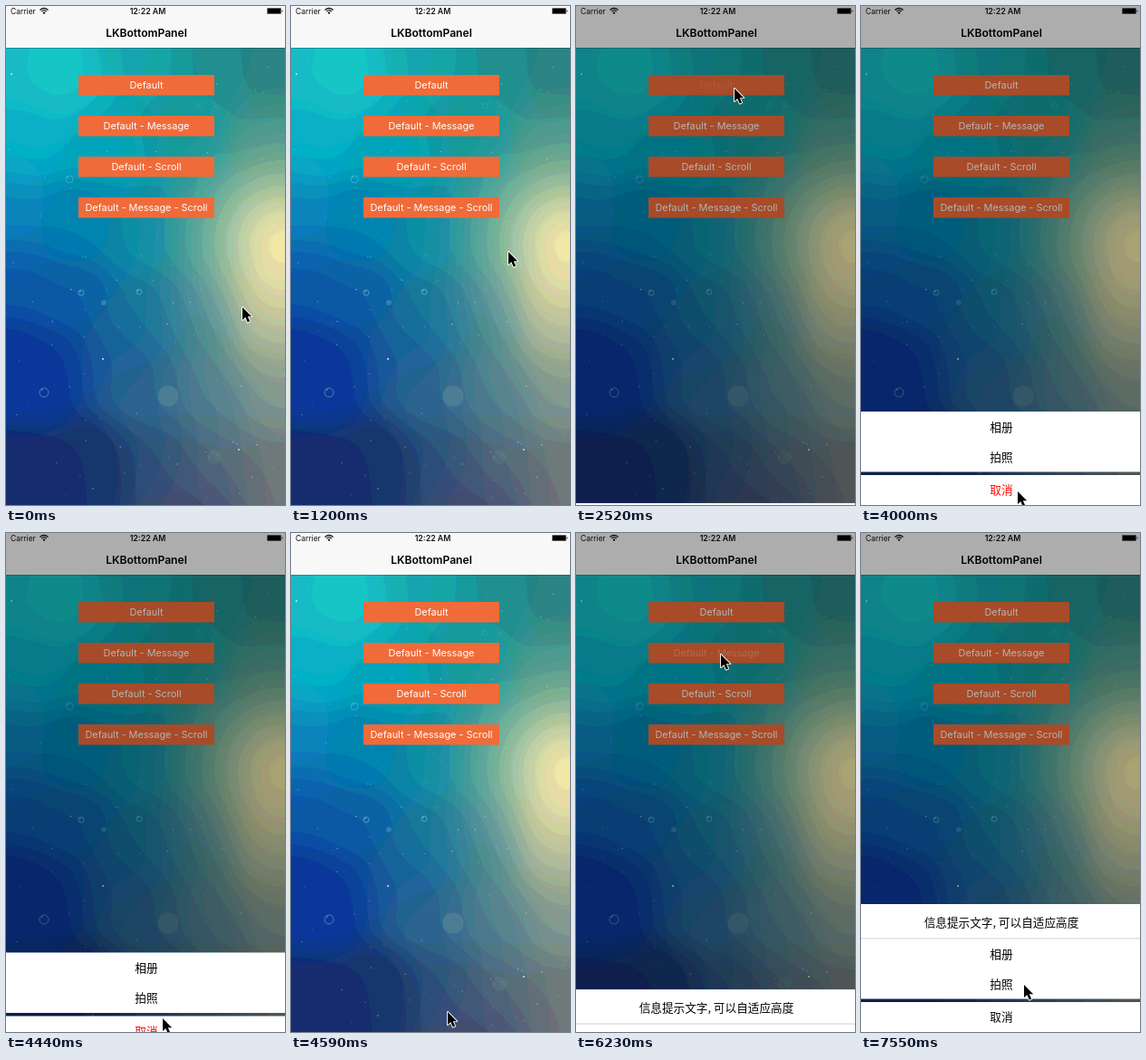
Animation, 308 px wide and 550 px high, one loop 8 s. Source, as an HTML page with a canvas:

```html
<!DOCTYPE html>
<html lang="zh-CN">
<head>
<meta charset="utf-8">
<title>Action sheet demo</title>
<style>
html, body { margin: 0; width: 100%; height: 100%; overflow: hidden; background: #fff; }
canvas { display: block; width: 308px; height: 550px; }
</style>
</head>
<body>
<canvas id="stage"></canvas>
<script>
const W = 308, H = 550, LOOP = 8000, NAV = 46;
const LATIN = 'Inter, Roboto, sans-serif';
const HAN = '"Noto Sans CJK SC", "Noto Sans CJK", sans-serif';

const canvas = document.getElementById('stage');
const dpr = window.devicePixelRatio || 1;
canvas.width = W * dpr;
canvas.height = H * dpr;
const ctx = canvas.getContext('2d');

// ---------- wallpaper ----------
const TINTS = [
  [0, 60, '14bfc8'], [60, 80, '1cc4cc'], [150, 60, '14a9ac'], [225, 60, '1d9090'], [300, 60, '2a8082'],
  [20, 150, '05aec8'], [110, 150, '00a5b8'], [190, 130, '12989c'], [300, 140, '3a9088'],
  [0, 230, '0a86bc'], [80, 240, '0080b0'], [150, 250, '0a8ca4'], [215, 250, '2f9498'],
  [0, 295, '0758aa'], [70, 320, '0a5ca4'], [150, 340, '13769c'], [210, 340, '347f90'], [300, 350, '7f9a8c'],
  [0, 390, '06359a'], [50, 400, '06369a'], [120, 390, '1a5c96'], [155, 430, '2f6890'],
  [225, 430, '4c7d8c'], [300, 430, '77908a'],
  [20, 525, '12306e'], [100, 500, '15316c'], [170, 500, '2a5278'], [230, 505, '55707e'], [300, 515, '6c7478'],
  [205, 540, '45486f']
].map(([x, y, hex]) => ({ x, y, rgb: [0, 2, 4].map(i => parseInt(hex.substr(i, 2), 16)) }));

function seeded(seed) {
  return () => (seed = (seed * 16807) % 2147483647) / 2147483647;
}

function ring(g, x, y, r, alpha) {
  g.strokeStyle = `rgba(190,225,230,${alpha})`;
  g.lineWidth = 1;
  g.beginPath();
  g.arc(x, y, r, 0, Math.PI * 2);
  g.stroke();
  g.fillStyle = `rgba(235,250,250,${alpha})`;
  g.fillRect(x - r * 0.6, y - r * 0.7, 1.5, 1.5);
}

function disc(g, x, y, r, color) {
  g.fillStyle = color;
  g.beginPath();
  g.arc(x, y, r, 0, Math.PI * 2);
  g.fill();
}

function makeWallpaper() {
  const layer = document.createElement('canvas');
  layer.width = W;
  layer.height = H;
  const g = layer.getContext('2d');
  const img = g.createImageData(W, H);
  const warm = [240, 228, 166];
  const band = v => Math.round(v / 11) * 11;
  for (let y = 0; y < H; y++) {
    for (let x = 0; x < W; x++) {
      const sum = [0, 0, 0];
      let total = 0;
      for (const p of TINTS) {
        const dx = x - p.x, dy = y - p.y;
        const w = Math.exp(-(dx * dx + dy * dy) / 1700);
        total += w;
        for (let c = 0; c < 3; c++) sum[c] += p.rgb[c] * w;
      }
      // the glow reaches further down than up
      const gx = (x - 304) / 80, gy = (y - 262) / (y < 262 ? 86 : 112);
      const glow = Math.exp(-(gx * gx + gy * gy));
      const i = (y * W + x) * 4;
      for (let c = 0; c < 3; c++) {
        const v = sum[c] / total;
        img.data[i + c] = band(v + (warm[c] - v) * glow);
      }
      img.data[i + 3] = 255;
    }
  }
  g.putImageData(img, 0, 0);

  const rand = seeded(4127);
  for (let i = 0; i < 130; i++) {
    const y = 55 + 490 * Math.pow(rand(), 0.75);
    const x = i % 2 ? rand() * W : Math.min(W, 70 + rand() * 240);
    disc(g, x, y, 0.4 + rand() * 0.4, `rgba(215,230,200,${0.25 + rand() * 0.5})`);
  }
  disc(g, 179, 430, 11.5, 'rgba(150,180,175,.22)');
  disc(g, 230, 497, 8, 'rgba(160,170,165,.12)');
  disc(g, 108, 327, 3, 'rgba(150,200,210,.3)');
  disc(g, 107, 389, 1.1, '#cfe0d8');
  disc(g, 6, 75, 1, '#b5eee8');
  disc(g, 257, 489, 1.1, '#dcdcae');
  ring(g, 42, 426, 5, 0.4);
  ring(g, 70, 191, 4, 0.3);
  ring(g, 83, 316, 3, 0.4);
  ring(g, 147, 315, 3, 0.4);
  ring(g, 214, 110, 3, 0.12);
  return layer;
}
const wallpaper = makeWallpaper();

// ---------- screen ----------
function text(str, x, y, font, color, align = 'center') {
  ctx.font = font;
  ctx.fillStyle = color;
  ctx.textAlign = align;
  ctx.textBaseline = 'alphabetic';
  ctx.fillText(str, x, y);
}

function rect(x, y, w, h, color) {
  ctx.fillStyle = color;
  ctx.fillRect(x, y, w, h);
}

function drawBar() {
  rect(0, 0, W, NAV, '#f8f8f8');
  rect(0, NAV, W, 0.75, 'rgba(0,0,0,.3)');
  text('Carrier', 5, 9, `8.5px ${LATIN}`, '#111', 'left');
  text('12:22 AM', 156.5, 9, `600 8.8px ${LATIN}`, '#111');
  text('LKBottomPanel', 155, 34, `600 12.1px ${LATIN}`, '#000');

  ctx.strokeStyle = '#111';
  ctx.lineWidth = 1.3;
  for (const r of [3.6, 6]) {
    ctx.beginPath();
    ctx.arc(42, 8.5, r, -Math.PI * 0.77, -Math.PI * 0.23);
    ctx.stroke();
  }
  disc(ctx, 42, 7.6, 1.2, '#111');

  ctx.fillStyle = '#666';
  ctx.beginPath();
  ctx.roundRect(288, 2, 16, 7, 1.3);
  ctx.fill();
  rect(289, 3, 14, 5, '#000');
  rect(304.5, 4.5, 1, 2, '#333');
}

const BUTTONS = ['Default', 'Default - Message', 'Default - Scroll', 'Default - Message - Scroll'];

function drawButtons(pressed, alpha) {
  BUTTONS.forEach((label, i) => {
    const y = 76 + 45 * i;
    rect(80, y, 150, 22.5, '#f06b39');
    text(label, 155, y + 15.3, `10.9px ${LATIN}`, `rgba(255,255,255,${i === pressed ? alpha : 1})`);
  });
}

function drawSheet(withMessage, shown) {
  const top = withMessage ? 409 : 447;
  ctx.save();
  ctx.translate(0, (1 - shown) * (H - top));
  rect(0, top, W, 513.5 - top, '#fff');
  rect(0, 517, W, 33, '#fff');
  const row = (str, y, color = '#000') => text(str, 155, y, `12.65px ${HAN}`, color);
  if (withMessage) {
    row('信息提示文字, 可以自适应高度', 433.5);
    rect(0, 446.5, W, 1, '#cfcfcf');
  }
  row('相册', 468.7);
  row('拍照', 501.7);
  row('取消', 538.2, withMessage ? '#000' : '#f00');
  ctx.restore();
}

// ---------- pointer ----------
const START = { x: 261, y: 332 };
// Each move changes the picture n times, first at t0 and last at t1.
const MOVES = [
  { t0: 1050, t1: 1640, n: 5, x: 178, y: 93 },
  { t0: 1930, t1: 2230, n: 3, x: 175, y: 91 },
  { t0: 3120, t1: 4000, n: 7, x: 173, y: 535, bulge: 27 },
  { t0: 4590, t1: 5330, n: 6, x: 161, y: 152 },
  { t0: 5480, t1: 5780, n: 3, x: 160, y: 134 },
  { t0: 6670, t1: 7260, n: 5, x: 181, y: 506 },
  { t0: 7410, t1: 7550, n: 2, x: 180, y: 498 }
];

const ease = u => u < 0.5 ? 4 * u ** 3 : 1 - (2 - 2 * u) ** 3 / 2;

function pointerAt(t) {
  let pos = START;
  for (const m of MOVES) {
    if (t < m.t0) break;
    const step = Math.floor((t - m.t0) / (m.t1 - m.t0) * (m.n - 1) + 0.04) + 1;
    const k = ease(Math.min(1, step / m.n));
    pos = {
      x: Math.round(pos.x + (m.x - pos.x) * k + (m.bulge || 0) * Math.sin(Math.PI * k)),
      y: Math.round(pos.y + (m.y - pos.y) * k)
    };
  }
  return pos;
}

const ARROW = new Path2D('M0 0V14L3.3 11L5.7 16.6L8.2 15.5L5.8 10.2H10.2Z');

function drawPointer({ x, y }) {
  ctx.save();
  ctx.translate(x, y);
  ctx.lineJoin = 'round';
  ctx.lineWidth = 1.8;
  ctx.strokeStyle = '#fff';
  ctx.stroke(ARROW);
  ctx.fillStyle = '#000';
  ctx.fill(ARROW);
  ctx.restore();
}

// ---------- timeline ----------
// The dimming switches hard; only the sheet and the pressed label move through stages.
const STATES = [
  { t: 0, dim: false, shown: 0, label: 1 },
  { t: 2520, dim: true, shown: 0.02, label: 0.15 },
  { t: 2670, dim: true, shown: 0.75, label: 0.7 },
  { t: 2820, dim: true, shown: 1, label: 1 },
  { t: 4300, dim: true, shown: 0.85, label: 1 },
  { t: 4450, dim: true, shown: 0.13, label: 1 },
  { t: 4590, dim: false, shown: 0, label: 1 },
  { t: 6230, dim: true, shown: 0.333, label: 0.32 },
  { t: 6370, dim: true, shown: 0.97, label: 0.8 },
  { t: 6520, dim: true, shown: 1, label: 1 }
];

function draw(t) {
  const state = STATES.filter(s => s.t <= t).pop();
  const second = t > 5000;
  ctx.setTransform(dpr, 0, 0, dpr, 0, 0);
  ctx.drawImage(wallpaper, 0, 0);
  drawBar();
  drawButtons(second ? 1 : 0, state.label);
  if (state.dim) rect(0, 0, W, H, 'rgba(0,0,0,.3)');
  if (state.shown) drawSheet(second, state.shown);
  drawPointer(pointerAt(t));
}

const begin = performance.now();
function tick() {
  draw((performance.now() - begin) % LOOP);
  requestAnimationFrame(tick);
}
tick();
</script>
</body>
</html>
```
